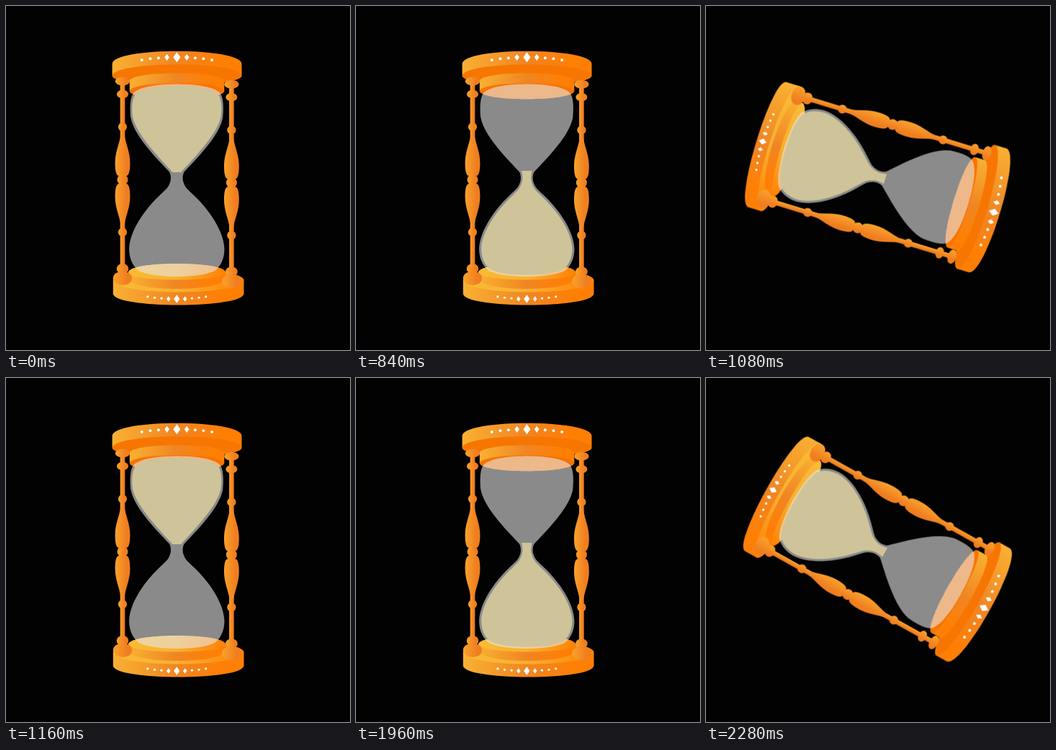
An HTML page that plays this animation: 478 by 478 pixels, repeating every 2.32 s.

```html
<!DOCTYPE html>
<html lang="en">
<head>
<meta charset="utf-8">
<title>Hourglass</title>
<style>
html, body { margin: 0; width: 100%; height: 100%; overflow: hidden; background: #020202; }
svg { display: block; width: 100%; height: 100%; }
#hourglass { transform-origin: 239px 239px; animation: turn 2320ms step-end infinite; }
.level { animation: 2320ms step-end infinite; }
#full { animation-name: full; }
#high { animation-name: high; }
#half { animation-name: half; }
#low { animation-name: low; }
#empty { animation-name: empty; }

@keyframes turn {
  0%, 50%, 100% { transform: rotate(0deg); }
  41.37% { transform: rotate(2deg); }
  43.1% { transform: rotate(26deg); }
  44.82% { transform: rotate(66deg); }
  46.55% { transform: rotate(107deg); }
  48.27% { transform: rotate(148deg); }
  93.1% { transform: rotate(3deg); }
  94.82% { transform: rotate(38deg); }
  96.55% { transform: rotate(79deg); }
  98.27% { transform: rotate(119.2deg); }
}
@keyframes full {
  0%, 50% { visibility: visible; }
  10.34%, 58.62%, 100% { visibility: hidden; }
}
@keyframes high {
  0%, 18.96%, 67.24%, 100% { visibility: hidden; }
  10.34%, 58.62% { visibility: visible; }
}
@keyframes half {
  0%, 27.58%, 75.86%, 100% { visibility: hidden; }
  18.96%, 67.24% { visibility: visible; }
}
@keyframes low {
  0%, 36.2%, 84.48%, 100% { visibility: hidden; }
  27.58%, 75.86% { visibility: visible; }
}
@keyframes empty {
  0%, 50% { visibility: hidden; }
  36.2%, 84.48%, 100% { visibility: visible; }
}
</style>
</head>
<body>
<svg viewBox="0 0 478 478">
  <defs>
    <linearGradient id="wall">
      <stop offset="0" stop-color="#f9b033"/>
      <stop offset=".5" stop-color="#f08522"/>
      <stop offset=".85" stop-color="#ff7f05"/>
    </linearGradient>
    <linearGradient id="gold">
      <stop offset="0" stop-color="#f9bb35"/>
      <stop offset=".5" stop-color="#f8b030"/>
      <stop offset="1" stop-color="#ff8204"/>
    </linearGradient>
    <linearGradient id="wood">
      <stop offset="0" stop-color="#f9a22c"/>
      <stop offset=".75" stop-color="#f07e20"/>
    </linearGradient>

    <!-- right halves, mirrored about x = 237.3 -->
    <path id="glassHalf" d="M236.5 108.5C259 108.5 287 111 297 120.5C303 127 302.3 145 301.3 155C297 178 272 205 248 230C245 234 245 242 247 246C249 253 255 257 262 264C281 282 303 312 303.5 338C303.3 352 298 362 290 368C278 374 256 376 236.5 376Z"/>
    <path id="innerHalf" d="M236.5 111C261 111 287 114 295 123C300 130 300 145 298.5 154C294 176 268 204 244 230L243 240C245 254 252 258 258.5 265C277 282 300 312 300.5 338C300 350 296 360 288 366C276 372 256 373.5 236.5 373.5Z"/>
    <clipPath id="inside">
      <use href="#innerHalf"/>
      <use href="#innerHalf" transform="translate(474.6) scale(-1 1)"/>
    </clipPath>

    <path id="baluster" d="M-2.8 180C-4.5 192 -10.4 203 -10.4 218C-10.4 230 -8.5 236 -5 236H5C8.5 236 10.4 230 10.4 218C10.4 203 4.5 192 2.8 180Z"/>
    <g id="post" fill="url(#wood)">
      <rect x="-3.3" y="104" width="6.6" height="266"/>
      <ellipse cy="104.4" rx="10.2" ry="6"/>
      <ellipse cy="122.4" rx="8" ry="5.8"/>
      <circle cy="168" r="6.1"/>
      <use href="#baluster"/>
      <circle cy="241.3" r="7.5"/>
      <use href="#baluster" transform="translate(0 483) scale(1 -1)"/>
      <circle cy="314.3" r="6.1"/>
      <ellipse cy="365" rx="8.3" ry="7"/>
      <ellipse cy="378.2" rx="13.2" ry="9.8"/>
    </g>
    <path id="diamond" d="M0 -7L5 0L0 7L-5 0Z"/>
    <g id="trim" fill="#fff">
      <use href="#diamond"/>
      <use href="#diamond" transform="translate(-13.8) scale(.66)"/>
      <use href="#diamond" transform="translate(13.8) scale(.66)"/>
      <circle cx="-25.5" cy="1" r="2"/><circle cx="25.5" cy="1" r="2"/>
      <circle cx="-37" cy="2" r="2"/><circle cx="37" cy="2" r="2"/>
      <circle cx="-48.7" cy="3.7" r="2"/><circle cx="48.7" cy="3.7" r="2"/>
    </g>
    <g id="drops">
      <path d="M231 229H244L242.5 237Q241 242 237.5 242Q233.5 242 232 237Z"/>
      <ellipse cx="237" cy="251" rx="3.5" ry="4.2"/>
    </g>
    <path id="bump" d="M-14 4Q-6 2 -4.5 -3Q0 -11 4.5 -3Q6 2 14 4Z"/>
  </defs>

  <rect width="478" height="478" fill="#020202"/>
  <g id="hourglass">
    <!-- cap -->
    <path fill="url(#wall)" d="M147.6 80C150 57 325 57 327.5 80V97C325 113.5 150 113.5 147.6 97Z"/>
    <path fill="#f77602" d="M147.6 97C150 76 325 76 327.5 97C325 113.5 150 113.5 147.6 97Z"/>
    <path fill="url(#wall)" d="M171.8 104C174 89.5 301 89.5 303.3 104V118C301 133 174 133 171.8 118Z"/>
    <path fill="#f77402" d="M171.8 118C174 103.5 301 103.5 303.3 118C301 133 174 133 171.8 118Z"/>
    <use href="#trim" x="237.4" y="71.3"/>

    <!-- base -->
    <path fill="url(#wall)" d="M148.8 381C151 361 328 361 330.5 381V400C328 420.6 151 420.6 148.8 400Z"/>
    <path fill="url(#gold)" d="M148.8 381C151 361 328 361 330.5 381C328 403 151 403 148.8 381Z"/>
    <path fill="url(#wall)" d="M170 370C172 354 303 354 305 370V378C303 398 172 398 170 378Z"/>
    <path fill="url(#gold)" d="M170 370C172 354 303 354 305 370C303 384 172 384 170 370Z"/>
    <use href="#trim" transform="translate(237.3 407) scale(.83 -.83)"/>

    <use href="#post" x="162"/>
    <use href="#post" x="313.4" y="4.3"/>

    <g fill="#e6e6e6" opacity=".6">
      <use href="#glassHalf"/>
      <use href="#glassHalf" transform="translate(474.6) scale(-1 1)"/>
    </g>

    <g fill="#cfc399">
      <g id="full" class="level">
        <path clip-path="url(#inside)" d="M160 100H315V231H160Z"/>
      </g>
      <g id="high" class="level">
        <path clip-path="url(#inside)" d="M160 143Q237 125 315 143V231H160ZM160 349Q237 331 315 349V380H160Z"/>
        <use href="#drops"/>
        <circle cx="238" cy="270" r="3.6"/>
        <circle cx="238" cy="300" r="3.6"/>
        <use href="#bump" x="238" y="338"/>
      </g>
      <g id="half" class="level">
        <path clip-path="url(#inside)" d="M160 168Q234 145 315 170V231H160ZM160 317Q237 284 315 317V380H160Z"/>
        <use href="#drops"/>
        <circle cx="238" cy="269.6" r="3.6"/>
        <use href="#bump" x="238" y="299"/>
      </g>
      <g id="low" class="level">
        <path clip-path="url(#inside)" d="M160 206Q237 186 315 206V231H160ZM160 289Q237 258 315 289V380H160Z"/>
        <use href="#drops"/>
        <use href="#bump" x="238" y="272"/>
      </g>
      <g id="empty" class="level">
        <path clip-path="url(#inside)" d="M160 229H315V380H160Z"/>
      </g>
    </g>
  </g>
</svg>
</body>
</html>
```
